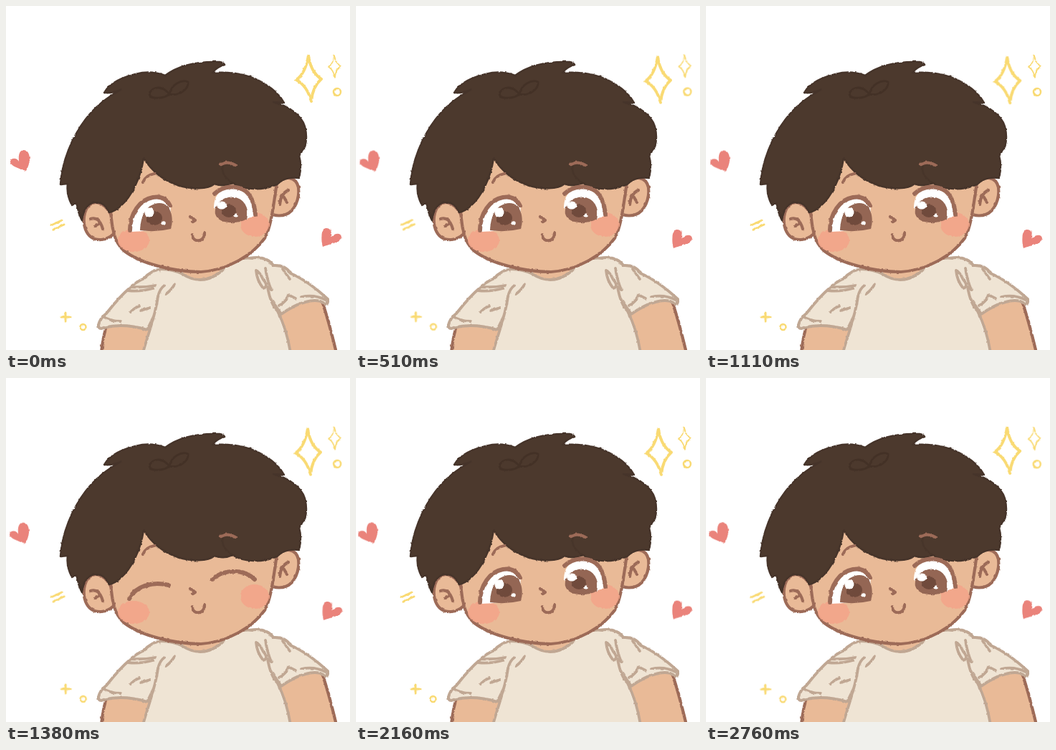
An HTML page for the animation above (2.79 s loop, 480x480 px).

```html
<!DOCTYPE html>
<html lang="en">
<head>
<meta charset="utf-8">
<title>Smiling boy</title>
<style>
html, body { margin: 0; width: 100%; height: 100%; overflow: hidden; background: #fff; }
svg { display: block; width: 100vw; height: 100vh; }
path, ellipse, circle { stroke-linecap: round; stroke-linejoin: round; }
.line { fill: none; stroke: #9d6b58; stroke-width: 4.2; }
.lash { fill: none; stroke: #9d6b58; stroke-width: 6; }
.skin { fill: #e9ba97; stroke: #9d6b58; stroke-width: 4.2; }
.cloth { fill: #efe4d4; stroke: #c0a793; stroke-width: 4; }
.fold { fill: none; stroke: #c0a793; stroke-width: 3.8; }
.gold { fill: none; stroke: #f9da73; }
.heart { fill: #ea837b; }
.iris { fill: #946654; }
.pupil { fill: #704a3c; }
.white { fill: #fff; }

.open, .shut, .drift { animation: 2790ms linear infinite; }
.open { animation-name: open; animation-timing-function: step-end; }
.shut { animation-name: shut; animation-timing-function: step-end; }
.left { animation-name: left; }
.right { animation-name: right; }
.star { animation-name: star; }
.spark { animation-name: spark; }

/* hard blink between 1290 and 1500 ms */
@keyframes open { 0%, 53.76% { opacity: 1 } 46.23% { opacity: 0 } }
@keyframes shut { 0%, 53.76% { opacity: 0 } 46.23% { opacity: 1 } }
@keyframes left {
  0%, 100% { transform: translate(0, 0) }
  18.3% { transform: translate(-.8px, .5px) }
  39.8% { transform: translate(0, .5px) }
  49.5% { transform: translate(-1px, .7px) }
  64.5%, 77.4% { transform: translate(-3px, .4px) }
  98.9% { transform: translate(-2px, .2px) }
}
@keyframes right {
  0%, 100% { transform: translate(0, 0) }
  18.3%, 39.8% { transform: translate(1px, 2px) }
  49.5%, 64.5% { transform: translate(1.2px, 2px) }
  77.4% { transform: translate(1px, .6px) }
  98.9% { transform: translate(1px, .2px) }
}
@keyframes star {
  0%, 100% { transform: translate(0, 0) }
  18.3%, 49.5% { transform: translate(-1px, 1.6px) }
  39.8% { transform: translate(-1.8px, 2.2px) }
  64.5%, 77.4% { transform: translate(0, 1.8px) }
  98.9% { transform: translate(-2px, 0) }
}
@keyframes spark {
  0%, 39.8%, 77.4%, 100% { transform: translate(0, 0) }
  18.3%, 64.5% { transform: translate(.4px, -.4px) }
  98.9% { transform: translate(-.3px, .3px) }
}
</style>
</head>
<body>
<svg viewBox="0 0 480 480">
  <defs>
    <!-- crayon edge -->
    <filter id="rough" filterUnits="userSpaceOnUse" x="0" y="0" width="480" height="480" color-interpolation-filters="sRGB">
      <feTurbulence type="fractalNoise" baseFrequency=".2" numOctaves="2" seed="4"/>
      <feDisplacementMap in="SourceGraphic" scale="2.6" xChannelSelector="R" yChannelSelector="G"/>
      <feGaussianBlur stdDeviation=".35"/>
    </filter>
  </defs>

  <g filter="url(#rough)">
    <!-- arms -->
    <path fill="#e9ba97" d="M138 446 Q134 464 132 484 H194 L202 446Z"/>
    <path class="line" d="M139 451 Q135 464 133 484"/>
    <path fill="#e9ba97" d="M380 426 L398 484 H463 Q452 440 440 406Z"/>
    <path class="line" d="M441 412 Q450 438 461 484"/>

    <!-- shirt -->
    <path class="cloth" d="M216 367 Q202 369 193 380 Q181 385 172 394 C158 406 148 419 140 429 Q131 436 129 445 Q129 452 136 449 Q164 442 197 452 L222 400Z"/>
    <path class="cloth" d="M340 352 Q363 348 373 362 Q390 361 397 373 C418 382 436 397 449 409 Q450 417 445 416 Q436 408 418 413 Q402 417 384 430 L356 390Z"/>
    <path fill="#efe4d4" d="M191 484 C202 452 207 420 216 367 L248 372 L303 366 Q324 350 345 352 C360 380 378 422 398 484Z"/>
    <path class="fold" d="M191 484 C198 458 209 431 212 405 M212 405 Q215 394 221 390 M216 367 Q232 367 247 374 M303 366 Q322 349 344 352 M365 392 Q369 416 379 426 Q392 452 397 484"/>
    <path class="fold" d="M135 433 Q146 440 160 440 M412 406 Q430 402 446 410"/>
    <path class="fold" d="M170 397 Q188 399 205 394 M174 392 Q192 393 208 390 M235 389 Q230 397 223 402 M174 427 Q179 421 186 419 M188 425 L201 421"/>
    <path class="fold" d="M349 369 Q350 383 359 394 Q367 391 359 382 Q354 371 349 369 M362 366 Q364 381 370 396 M386 367 L396 381 M381 418 Q391 413 394 403 M396 404 L404 408"/>

    <!-- neck -->
    <path fill="#e9ba97" d="M247 364 L247 374 Q274 394 303 366 V355Z"/>
    <path class="fold" d="M246 374 Q276 393 304 367"/>

    <!-- back hair -->
    <path fill="#4c392d" d="M90 200 Q80 225 75 249 L86 247 Q82 262 92 278 L98 275 Q99 292 107 302 L150 290 L190 210Z"/>

    <!-- face and ears -->
    <path fill="#e9ba97" d="M146 286 C148 312 151 329 164 341 C188 360 235 371 272 371 C308 369 344 348 361 324 C370 308 373 280 378 246 L190 200Z"/>
    <path class="skin" d="M147 292 Q138 275 125 274 C109 276 106 298 111 312 Q117 327 133 326 Q143 325 149 319"/>
    <path class="skin" d="M378 246 C388 236 405 238 408 253 C410 268 403 287 390 291 Q381 294 372 291"/>
    <path class="line" d="M118 297 Q130 293 135 311 M124 307 L131 303"/>
    <path class="line" d="M394 257 Q383 262 382 277 M388 267 L392 274"/>
    <path class="line" d="M146 286 C148 312 151 329 164 341 C188 360 235 371 272 371 C308 369 344 348 361 324 C370 308 373 280 378 246"/>

    <!-- cheeks -->
    <g fill="#f4a58a" opacity=".9">
      <ellipse cx="178" cy="327" rx="22" ry="16"/>
      <ellipse cx="347" cy="305" rx="20" ry="17"/>
    </g>

    <!-- front hair -->
    <path fill="#4c392d" stroke="#46342a" stroke-width="2.5" d="M76 249
      C78 217 92 183 111 158 Q129 134 160 117 Q148 122 137 121
      C145 106 164 98 190 93 Q207 91 222 97 C240 83 268 77 298 78 Q304 79 305 82
      Q294 85 288 93 C320 91 346 98 363 110 Q380 120 388 135 L373 134
      C393 139 412 152 417 168 Q421 184 417 196 L409 209 Q413 222 409 240
      Q390 237 378 249 C357 258 332 257 316 247 Q303 253 291 248
      C282 256 258 256 240 250 C218 243 202 228 192 212
      C188 240 175 266 160 279 Q151 287 144 288 Q138 273 123 274 Q109 277 106 299
      L98 275 L92 278 Q84 263 86 248Z"/>
    <path fill="none" stroke="#3c2b21" stroke-width="3" opacity=".55" d="M228 123 C218 111 207 112 201 120 C196 130 217 131 228 123 C231 109 245 102 254 106 C255 116 242 126 228 123"/>
    <path fill="none" stroke="#402f25" stroke-width="2.5" opacity=".4" d="M303 222 Q298 236 318 248"/>

    <!-- features -->
    <path class="line" d="M191 246 Q195 236 207 234 M300 221 Q310 216 320 222"/>
    <path class="line" d="M257 294 L264 299 L261 301 M260 319 C259 330 277 331 277 317"/>
  </g>

  <g class="open"><g filter="url(#rough)">
    <path class="white" d="M174 315 C174 292 188 271 208 266 Q225 264 229 278 L231 300 Q222 314 174 315Z"/>
    <path class="iris" d="M187 313 C188 290 197 276 214 275 C232 275 234 299 230 311 Q210 316 187 313Z"/>
    <ellipse class="pupil" cx="207" cy="296" rx="11" ry="10"/>
    <circle class="white" cx="200" cy="288" r="6.500"/>
    <circle class="white" cx="220" cy="303" r="2.800"/>
    <path class="lash" d="M173 313 C173 289 187 270 205 267 Q222 264 229 279"/>

    <path class="white" d="M290 280 Q291 259 308 255 C330 250 348 269 349 292 L330 299 Q300 300 290 280Z"/>
    <path class="iris" d="M292 290 C290 273 307 264 320 267 C334 270 340 285 336 297 C326 304 296 306 292 290Z"/>
    <ellipse class="pupil" cx="311" cy="286" rx="10" ry="9"/>
    <ellipse class="white" cx="301" cy="278" rx="7" ry="5.500"/>
    <circle class="white" cx="321" cy="292" r="2.600"/>
    <path class="lash" d="M291 262 C304 250 322 250 334 258 Q346 268 348 291"/>
  </g></g>

  <g class="shut"><g filter="url(#rough)">
    <path class="lash" d="M172 308 C180 291 204 283 227 289 M288 281 C303 267 330 265 347 281"/>
  </g></g>

  <!-- decorations -->
  <g class="drift left"><g filter="url(#rough)">
    <path class="heart" d="M28 230 C20 227 5 224 6 216 C8 211 16 212 18 217 C17 207 19 201 25 201 C35 202 35 218 28 230Z"/>
  </g></g>
  <g class="drift right"><g filter="url(#rough)">
    <path class="heart" d="M442 336 C439 326 440 311 446 310 C453 309 455 316 454 322 C459 317 467 316 468 322 C467 330 452 332 442 336Z"/>
  </g></g>
  <g class="drift star"><g filter="url(#rough)">
    <path class="gold" stroke-width="4" d="M422 69 Q425 92 440 102 Q428 112 426 133 Q420 111 405 103 Q418 94 422 69Z"/>
  </g></g>
  <g class="drift spark"><g class="gold" filter="url(#rough)" stroke-width="2.5">
    <path stroke-width="1.7" d="M458 69 Q460 80 467 84 Q460 88 459 100 Q457 89 450 85 Q457 80 458 69Z"/>
    <circle cx="462" cy="120" r="5"/>
    <path stroke-width="3" d="M63 306 L78 299 M66 312 L81 305 M77 434 H90 M83 428 V440"/>
    <circle cx="107.500" cy="448" r="4"/>
  </g></g>
</svg>
</body>
</html>
```
